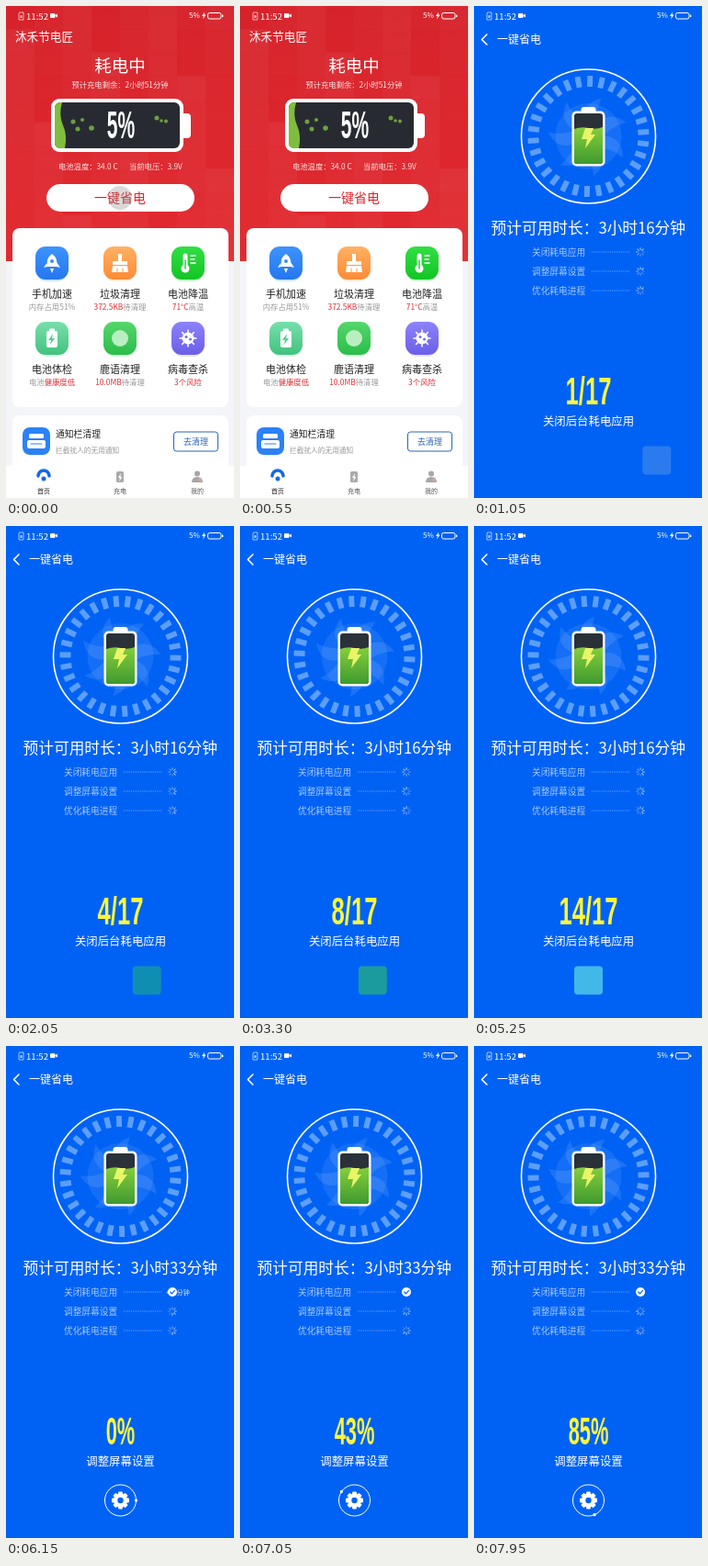
Write an HTML page that moves like this. It is 248 px wide and 536 px high and loops after 8 s.

```html
<!DOCTYPE html>
<html lang="zh-CN">
<head>
<meta charset="utf-8">
<style>
html, body { margin: 0; width: 100%; height: 100%; overflow: hidden; background: #0062f5; }
svg { display: block; width: 248px; height: 536px; }
text { font-family: "Noto Sans CJK SC", "Noto Sans CJK", "Noto Sans", sans-serif; white-space: pre; }
.num { font-family: "Liberation Sans", sans-serif; font-weight: 700; }
</style>
</head>
<body>
<svg id="stage" viewBox="0 0 248 536"></svg>
<script>
const LOOP = 8000;
const OPEN = [620, 940];
const APPS = { start: 1030, step: 307, count: 17 };
const SETTINGS = 6085;
const COLORS = ['#659ee8', '#f2a23c', '#42b8e8', '#159b9f', '#f06b56', '#7c78e8', '#e9bd3b', '#20a58c', '#4a9bf0', '#e87553', '#16b951'];

const clamp = v => Math.max(0, Math.min(1, v));
const easeOut = v => 1 - (1 - clamp(v)) ** 3;
const repeat = (n, draw) => Array.from({ length: n }, (_, i) => draw(i)).join('');
const rect = (x, y, w, h, r, fill, more = '') =>
  `<rect x="${x}" y="${y}" width="${w}" height="${h}" rx="${r}" fill="${fill}" ${more}/>`;
const circle = (x, y, r, fill, more = '') =>
  `<circle cx="${x}" cy="${y}" r="${r}" fill="${fill}" ${more}/>`;
const path = (d, fill, more = '') => `<path d="${d}" fill="${fill}" ${more}/>`;
const line = (d, color, width, more = '') =>
  path(d, 'none', `stroke="${color}" stroke-width="${width}" stroke-linecap="round" stroke-linejoin="round" ${more}`);
// y is the vertical middle of the glyphs
const text = (x, y, size, fill, str, more = '') =>
  `<text x="${x}" y="${y + size * 0.37}" font-size="${size}" fill="${fill}" ${more}>${str}</text>`;
const MID = 'text-anchor="middle"';
const mid = (x, y, size, fill, str, more = '') => text(x, y, size, fill, str, `${MID} ${more}`);
const at = (x, y, body, more = '') => `<g transform="translate(${x} ${y})" ${more}>${body}</g>`;
const red = s => `<tspan fill="#e02a30">${s}</tspan>`;
const gradient = (id, a, b) =>
  `<linearGradient id="${id}" x2="0" y2="1"><stop stop-color="${a}"/><stop offset="1" stop-color="${b}"/></linearGradient>`;
const bigNumber = (x, base, size, narrow, fill, str, id = '') =>
  `<g transform="translate(${x} ${base}) scale(${narrow} 1)"><text ${id} class="num" ${MID} font-size="${size}" fill="${fill}">${str}</text></g>`;

const statusBar = () =>
  line('M15 7h4v8h-5v-6z', '#fff', .8, 'opacity=".8"') + rect(15.5, 10, 2, 3, 0, '#fff', 'opacity=".7"') +
  text(22, 11, 9.6, '#fff', '11:52') +
  rect(48, 8, 5.5, 5, 1, '#fff') + path('M53 10.5l3-2v4z', '#fff') +
  text(199, 10.5, 8, '#fff', '5%') +
  path('M216 6.5l-3 4.5h2l-1 3.5 3.5-5h-2z', '#fff') +
  rect(219.5, 7.5, 14.5, 6.5, 2, 'none', 'stroke="#fff" stroke-width="1"') + rect(235, 9.5, 1.3, 2.5, .5, '#fff');

const GLYPHS = {
  rocket: path('M0-10Q7-5 5 4H-5Q-7-5 0-10zM-5-1l-4 6 4-1zM5-1l4 6-4-1z', '#fff') + circle(0, -2, 2, '#3c8dfa') + path('M-2 6h4l-2 5z', '#fff'),
  broom: path('M-2-10h4v8h6v4H-8v-4h6zM-8 3H8l1 7H-9z', '#fff') + line('M-3 6v4M3 6v4', '#ff9d49', 1),
  heat: line('M-3-8V3', '#fff', 5) + circle(-3, 6, 4.5, '#fff') + line('M-3-3V6', '#27cf3d', 1.5) + line('M3-8h5M3-4h4M3 0h5', '#fff', 1.5),
  check: rect(-6, -8, 12, 18, 2, '#fff') + rect(-3, -10.5, 6, 3, 1, '#fff') + path('M1-5l-5 7h3l-1 5 5-7H0z', '#53cf91'),
  virus: repeat(8, i => line('M0-5v-4', '#fff', 1.5, `transform="rotate(${i * 45})"`)) + circle(0, 0, 6.5, '#fff') +
    circle(-2, -1.5, 1.5, '#776cf0') + circle(2.5, 1, 1.5, '#776cf0'),
  chat: circle(0, 0, 9, '#b9efc0'),
};
const FEATURES = [
  ['rocket', '#3d93ff', '#2577ef', '手机加速', '内存占用51%'],
  ['broom', '#ffb164', '#ff8b35', '垃圾清理', red('372.5KB') + '待清理'],
  ['heat', '#31df43', '#13c525', '电池降温', red('71°C') + '高温'],
  ['check', '#79dfac', '#42c27e', '电池体检', '电池' + red('健康度低')],
  ['chat', '#55d66c', '#2bbd49', '鹿语清理', red('10.0MB') + '待清理'],
  ['virus', '#8c83fa', '#6b5ee8', '病毒查杀', red('3个风险')],
];
const feature = ([glyph, a, b, label, note], i) => {
  const x = 50 + i % 3 * 74, y = i < 3 ? 280 : 362;
  return gradient('f' + i, a, b) + rect(x - 17, y - 15, 34, 35, 11, a, 'opacity=".25"') +
    rect(x - 18, y - 18, 36, 36, 11, `url(#f${i})`) + at(x, y, GLYPHS[glyph]) +
    mid(x, y + 33.5, 11, '#222', label, 'font-weight="500"') + mid(x, y + 48, 8.4, '#999', note);
};

const home = () =>
  rect(0, 0, 248, 536, 0, '#f3f5f9') + gradient('redSky', '#d6222a', '#e22a30') + rect(0, 0, 248, 278, 0, 'url(#redSky)') +
  repeat(88, i => rect(i % 8 * 31, Math.floor(i / 8) * 25.3, 31, 25.3, 0, '#fff', `opacity="${(i * 37 % 11) / 200}"`)) +
  statusBar() + text(10, 33, 12.6, '#fff', '沐禾节电匠') +
  mid(124, 65, 18.5, '#fff', '耗电中') + mid(124, 86, 8.3, '#fbe3e3', '预计充电剩余：2小时51分钟') +
  rect(188, 117, 13, 27, 4, '#fff') + rect(49, 101, 144, 58, 9, '#fff') + rect(53, 105, 136, 50, 6, '#272b31') +
  path('M59 105h2q-4 14 1 25t2 25h-5q-6 0-6-6v-38q0-6 6-6z', '#80bd3e') +
  [[73, 126, 2.5], [83, 124, 2], [78, 134, 2.5], [93, 133, 2.8], [164, 122, 2.5], [169, 125, 1.8], [174, 125.5, 2]]
    .map(([x, y, r]) => circle(x, y, r, '#6f9f45')).join('') +
  bigNumber(125, 144, 42, .5, '#fff', '5%') +
  text(57, 175, 8.3, '#fbe3e3', '电池温度：34.0 C') + text(134, 175, 8.3, '#fbe3e3', '当前电压：3.9V') +
  rect(44, 194, 161, 30, 15, '#fff') + mid(124, 209, 14, '#df2228', '一键省电') +
  circle(124, 209, 13, '#777', 'id="touch"') +
  rect(7, 242, 235, 195, 8, '#fff') + FEATURES.map(feature).join('') +
  rect(7, 446, 235, 66, 8, '#fff') + rect(18, 459, 30, 30, 8, '#2b82f6') +
  rect(25, 466, 16, 5, 1.5, '#fff') + rect(23, 473, 20, 9, 2, '#fff') + line('M27 477h12', '#2b82f6', 1.2) +
  text(54, 466, 9.8, '#222', '通知栏清理', 'font-weight="500"') + text(54, 484, 7.7, '#999', '拦截扰人的无用通知') +
  rect(182.5, 464, 48, 21, 3, '#fff', 'stroke="#2865b8"') + mid(206.5, 474.5, 9, '#2865b8', '去清理') +
  rect(0, 501, 248, 35, 0, '#fff') +
  line('M35 512a6 6 0 0 1 12 0', '#1268e8', 3.5) + circle(41, 515, 2.5, '#1268e8') +
  rect(120, 507, 8, 12, 1.5, '#aaa') + path('M125 509l-3 5h2l-1 4 3.5-5h-2z', '#fff') +
  circle(208, 509.5, 3, '#a7a7a7') + path('M202 519q0-6 6-6t6 6z', '#a7a7a7') + circle(211, 516, 1.6, '#eaa39c') +
  mid(41, 528, 7, '#222', '首页') + mid(124, 528, 7, '#555', '充电') + mid(208, 528, 7, '#555', '我的');

const ROWS = ['关闭耗电应用', '调整屏幕设置', '优化耗电进程'];
const spinner = i => at(181, 268 + i * 21,
  `<g class="spin">${repeat(8, k => line('M0-2.4v-2', '#fff', 1, `opacity="${.25 + k * .07}" transform="rotate(${k * 45})"`))}</g>`,
  `id="wait${i}"`);
const row = (label, i) =>
  text(63, 268 + i * 21, 9.7, '#a5c8ff', label) +
  line(`M128 ${268 + i * 21}h41`, '#8fbaff', .9, 'stroke-dasharray=".8 1.2" style="stroke-linecap:butt"') + spinner(i);

const battery = () =>
  gradient('charge', '#86cf3c', '#3f9a2f') +
  rect(116.5, 110, 16, 9, 3, '#fff') + rect(106.5, 114.5, 36, 60, 5, '#fff') +
  rect(109, 117, 31, 55, 3, '#2b3139') +
  path('M109 134q8-3 16-1t15-1v37q0 3-3 3h-25q-3 0-3-3z', 'url(#charge)') +
  path('M121 133h9l-3 7h5l-11 15 2-10h-6z', '#e9f66a');

const gear = () =>
  repeat(8, i => rect(-2.4, -9.5, 4.8, 6, 1.2, '#fff', `transform="rotate(${i * 45})"`)) +
  circle(0, 0, 7.4, '#fff') + circle(0, 0, 3.2, '#0062f5');

const saver = () =>
  rect(0, 0, 248, 536, 0, '#0062f5') + statusBar() +
  line('M14 31l-5.5 5.5L14 42', '#fff', 1.5) + text(25, 37, 12, '#fff', '一键省电') +
  circle(124.5, 142, 73, 'none', 'stroke="#fff" stroke-width="1.6"') +
  at(124.5, 142,
    `<g id="dashes">${repeat(30, i => rect(-3, -66, 6, 12, .5, '#5c9efb', `transform="rotate(${i * 12 + 6})"`))}</g>` +
    circle(0, 0, 36, '#fff', 'opacity=".08"') +
    `<g id="fan">${repeat(7, i => path('M0 0Q4-38 32-30Q18-20 12 0z', '#fff', `opacity=".1" transform="rotate(${i * 360 / 7})"`))}</g>`) +
  battery() +
  mid(124.3, 241.5, 16.7, '#fff', '', 'id="estimate"') + ROWS.map(row).join('') +
  text(174, 268, 7, '#fff', '+17分钟', 'id="gain"') +
  at(181, 268, `<g id="tick">${circle(0, 0, 5, '#fff')}${line('M-2.2 0l1.7 1.8 3-3.4', '#0062f5', 1.2)}</g>`) +
  `<g id="counter">${bigNumber(0, 0, 42, 1, '#fdf63c', '', 'id="count"')}</g>` +
  mid(124.5, 452, 12.4, '#fff', '', 'id="task"') +
  rect(-15.5, -15.5, 31, 31, 4, '#fff', 'id="app"') +
  at(124.5, 495, circle(0, 0, 17, 'none', 'stroke="#fff" stroke-width="1"') + gear() +
    `<g id="orbit">${circle(17, 0, 1.6, '#fff')}</g>`, 'id="gear"');

const stage = document.getElementById('stage');
stage.innerHTML = `<g id="home">${home()}</g><g id="saver">${saver()}</g>`;
const el = id => document.getElementById(id);
const spinners = document.querySelectorAll('.spin');
const set = (id, name, value) => el(id).setAttribute(name, value);
const show = (id, on) => set(id, 'visibility', on ? 'inherit' : 'hidden');
const turn = (id, deg) => set(id, 'transform', `rotate(${deg})`);
const write = (id, str) => { if (el(id).textContent !== str) el(id).textContent = str; };

function render(t) {
  const opened = easeOut((t - OPEN[0]) / (OPEN[1] - OPEN[0]));
  set('home', 'transform', `translate(${-60 * opened} 0)`);
  set('saver', 'transform', `translate(${248 * (1 - opened)} 0)`);
  set('touch', 'opacity', .28 * (1 - clamp((t - 150) / 200)));

  turn('dashes', t * .03);
  turn('fan', t * .12);
  spinners.forEach(s => s.setAttribute('transform', `rotate(${Math.floor(t / 100) * 45})`));

  const settings = t >= SETTINGS;
  write('estimate', `预计可用时长：3小时${settings ? 33 : 16}分钟`);
  write('task', settings ? '调整屏幕设置' : '关闭后台耗电应用');
  set('counter', 'transform', `translate(124.5 434) scale(${settings ? .52 : .61} 1)`);

  const index = Math.max(0, Math.min(APPS.count - 1, Math.floor((t - APPS.start) / APPS.step)));
  const percent = Math.max(0, Math.floor((t - 6130) * 84.5 / 1800));
  write('count', settings ? percent + '%' : `${index + 1}/${APPS.count}`);

  const enter = clamp((t - APPS.start - index * APPS.step) / 230);
  const slide = 1 - (1 - enter) ** 2;
  show('app', !settings && t >= APPS.start);
  set('app', 'transform', `translate(${124.5 + 90 * (1 - slide)} 495)`);
  set('app', 'opacity', .3 + .7 * slide);
  set('app', 'fill', COLORS[index % COLORS.length]);

  show('gear', settings);
  turn('orbit', (t - 6150) * 67 / 1800 + (t - 6150) * .2);
  show('wait0', !settings);
  show('tick', settings);
  set('tick', 'transform', `scale(${easeOut((t - SETTINGS) / 80)})`);
  show('gain', settings);
  set('gain', 'opacity', .9 * (1 - clamp((t - SETTINGS - 80) / 180)));
}

const began = performance.now();
function frame() {
  render((performance.now() - began) % LOOP);
  requestAnimationFrame(frame);
}
render(0);
requestAnimationFrame(frame);
</script>
</body>
</html>
```
